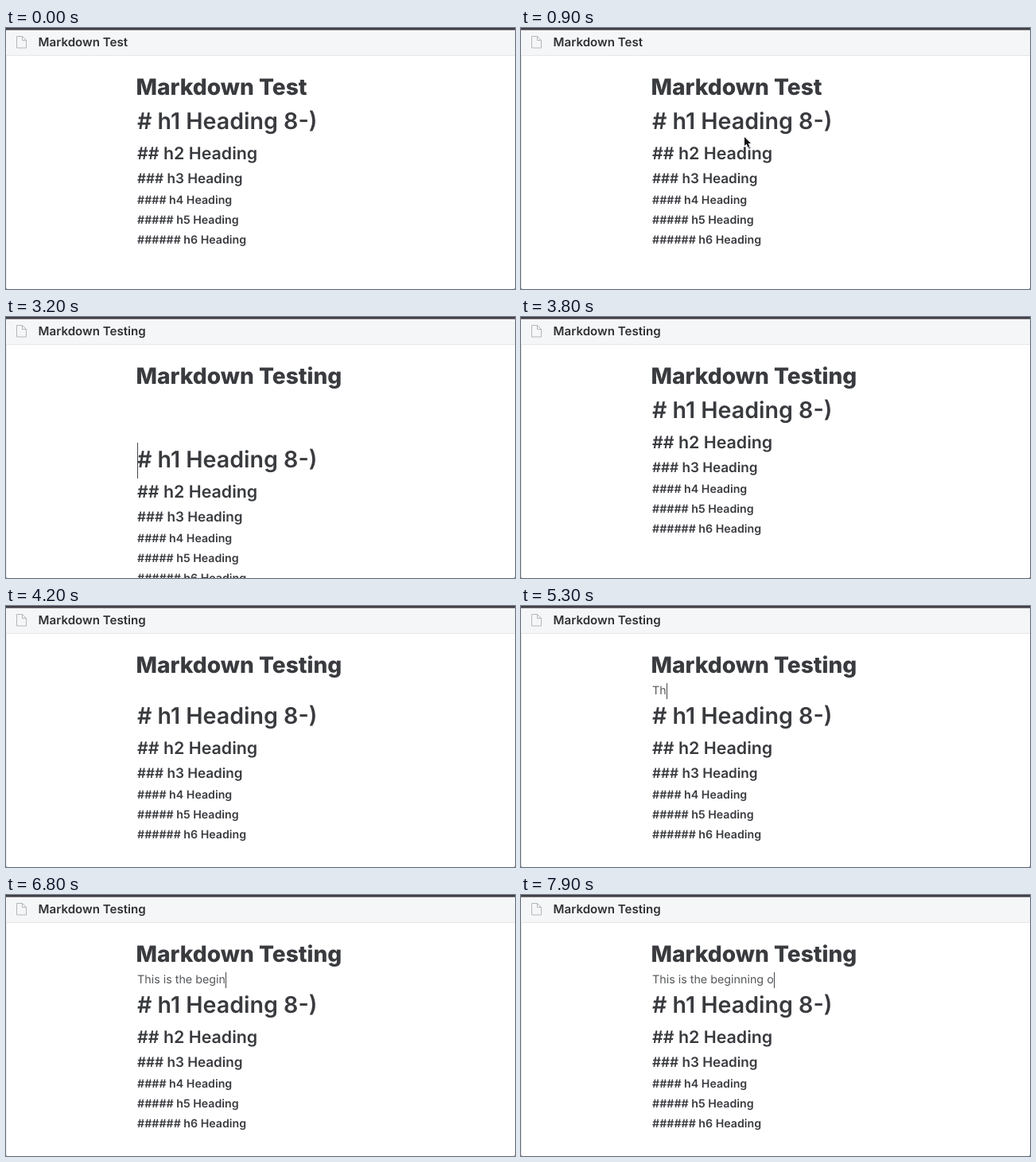
These frames come from a looping animation (640 by 328 pixels, 8000 ms). An HTML page with a canvas:

```html
<!DOCTYPE html>
<html lang="en">
<head>
<meta charset="utf-8">
<title>Markdown Test</title>
<style>
  html, body { margin: 0; width: 100%; height: 100%; overflow: hidden; background: #fff; }
  #stage { position: relative; width: 640px; height: 328px; overflow: hidden; }
  canvas { position: absolute; left: 0; top: 0; width: 640px; height: 328px; }
  .line {
    position: absolute; line-height: 0; white-space: pre; color: #393b3f;
    font-family: Inter, sans-serif; font-optical-sizing: none;
    text-rendering: geometricPrecision;
  }
  .caret { position: absolute; width: 1px; background: #45474b; }
</style>
</head>
<body>
<div id="stage"><canvas id="back"></canvas></div>
<script>
const LOOP = 8000, STEP = 100, W = 640, H = 328;
const stage = document.getElementById('stage');

function setupCanvas(canvas) {
  const ratio = window.devicePixelRatio || 1;
  canvas.width = W * ratio;
  canvas.height = H * ratio;
  const ctx = canvas.getContext('2d');
  ctx.scale(ratio, ratio);
  return ctx;
}

// y is the middle of the capitals
function addLine(text, x, y, size, weight, caretTop = 0, caretHeight = 0) {
  const el = document.createElement('div');
  const label = document.createElement('span');
  const caret = document.createElement('span');
  el.className = 'line';
  caret.className = 'caret';
  el.style.cssText = `left:${x}px;top:${y}px;font-size:${size}px;font-weight:${weight}`;
  caret.style.cssText = `top:${caretTop}px;height:${caretHeight}px`;
  label.textContent = text;
  el.append(label, caret);
  stage.append(el);
  return { el, label, caret, y };
}

function setLine(line, text, caretOn) {
  if (line.label.textContent !== text) line.label.textContent = text;
  line.caret.style.visibility = caretOn ? 'visible' : 'hidden';
}

const header = addLine('Markdown Test', 40.6, 17.5, 15.1, 600, -8.5, 18);
header.el.style.color = '#303134';
const title = addLine('Markdown Test', 163.5, 74.4, 28.1, 800);
const para = addLine('', 165, 106.5, 14.3, 400, -9.5, 20);
para.el.style.color = '#55575a';
const headings = [
  ['# h1 Heading 8-)', 117, 28.6],
  ['## h2 Heading', 157.5, 21.4],
  ['### h3 Heading', 190, 17.15],
  ['#### h4 Heading', 216.5, 14.2],
  ['##### h5 Heading', 241.5, 14.2],
  ['###### h6 Heading', 266.5, 14.2]
].map(([text, y, size]) => addLine(text, 165, y, size, 600));
const headingCaret = headings[0].caret;
headingCaret.style.cssText = 'left:0;top:-21px;height:45px';

const back = setupCanvas(document.getElementById('back'));
const overlay = document.createElement('canvas');
stage.append(overlay);
const front = setupCanvas(overlay);

function rect(color, x, y, w, h) {
  back.fillStyle = color;
  back.fillRect(x, y, w, h);
}

function drawWindow() {
  rect('#f5f6f8', 0, 2, W, 32);
  rect('#403d42', 0, 0, W, 2);
  rect('#85838a', 0, 2, W, 1);
  rect('#e6e7e9', 0, 34, W, 1);
  rect('#ececee', 0, 35, 1, H - 35);
  rect('#8b8b8d', 0, H - 1, 1, 1);
  rect('#8b8b8d', W - 1, H - 1, 1, 1);
  back.strokeStyle = '#b4b6b9';
  back.lineWidth = 1;
  back.stroke(new Path2D('M13.5 10.5H20.5L25.5 15.5V25H13.5ZM20.5 10.5V15.5H25.5'));
}

const arrow = new Path2D('M0 0V11L2.6 8.7L4.4 12.9L6.4 12L4.6 8H8Z');
const pointerPath = [[100, 632, 266], [900, 281, 137], [1300, 184, 10.5]];

function pointerAt(t) {
  const next = pointerPath.findIndex(p => t <= p[0]);
  if (next <= 0) return pointerPath[next < 0 ? 2 : 0].slice(1);
  const [t0, x0, y0] = pointerPath[next - 1], [t1, x1, y1] = pointerPath[next];
  const k = (t - t0) / (t1 - t0), e = k * k * (3 - 2 * k);
  return [x0 + (x1 - x0) * e, y0 + (y1 - y0) * e];
}

function drawPointer(t) {
  front.clearRect(0, 0, W, H);
  if (t < 100 || t >= 2400) return;
  front.save();
  front.translate(...pointerAt(t));
  front.strokeStyle = '#fff';
  front.lineWidth = 1.6;
  front.lineJoin = 'round';
  front.stroke(arrow);
  front.fillStyle = '#111';
  front.fill(arrow);
  front.restore();
}

// [time, characters visible from then on]
const sentence = 'This is the beginning o';
const keys = [
  [4800, 1], [5100, 2], [5400, 3], [5500, 4], [5600, 5], [5700, 6], [5800, 8],
  [6000, 9], [6100, 10], [6200, 11], [6300, 12], [6400, 13], [6500, 14], [6600, 15],
  [6800, 17], [6900, 18], [7200, 20], [7300, 21], [7400, 22], [7600, 23]
];
const typed = t => keys.reduce((n, [at, count]) => t >= at ? count : n, 0);
const within = (t, from, to) => t >= from && t < to;

function render(t) {
  const suffix = 'ing'.slice(0, Math.max(0, Math.floor((t - 2300) / 100)));
  setLine(header, 'Markdown Test' + suffix, within(t, 1300, 1800) || within(t, 2300, 3100));
  setLine(title, t < 3100 ? 'Markdown Test' : 'Markdown Testing', false);
  setLine(para, sentence.slice(0, typed(t)), t >= 4400);
  const shift = within(t, 3100, 3300) ? 62 : t >= 4000 ? 21.3 : 0;
  for (const { el, y } of headings) el.style.top = y + shift + 'px';
  for (const { caret } of headings) caret.style.visibility = 'hidden';
  headingCaret.style.visibility = within(t, 3100, 3700) ? 'visible' : 'hidden';
  drawPointer(t);
}

function tick() {
  const t = performance.now() % LOOP;
  render(Math.floor(t / STEP) * STEP);
  requestAnimationFrame(tick);
}

drawWindow();
tick();
</script>
</body>
</html>
```
